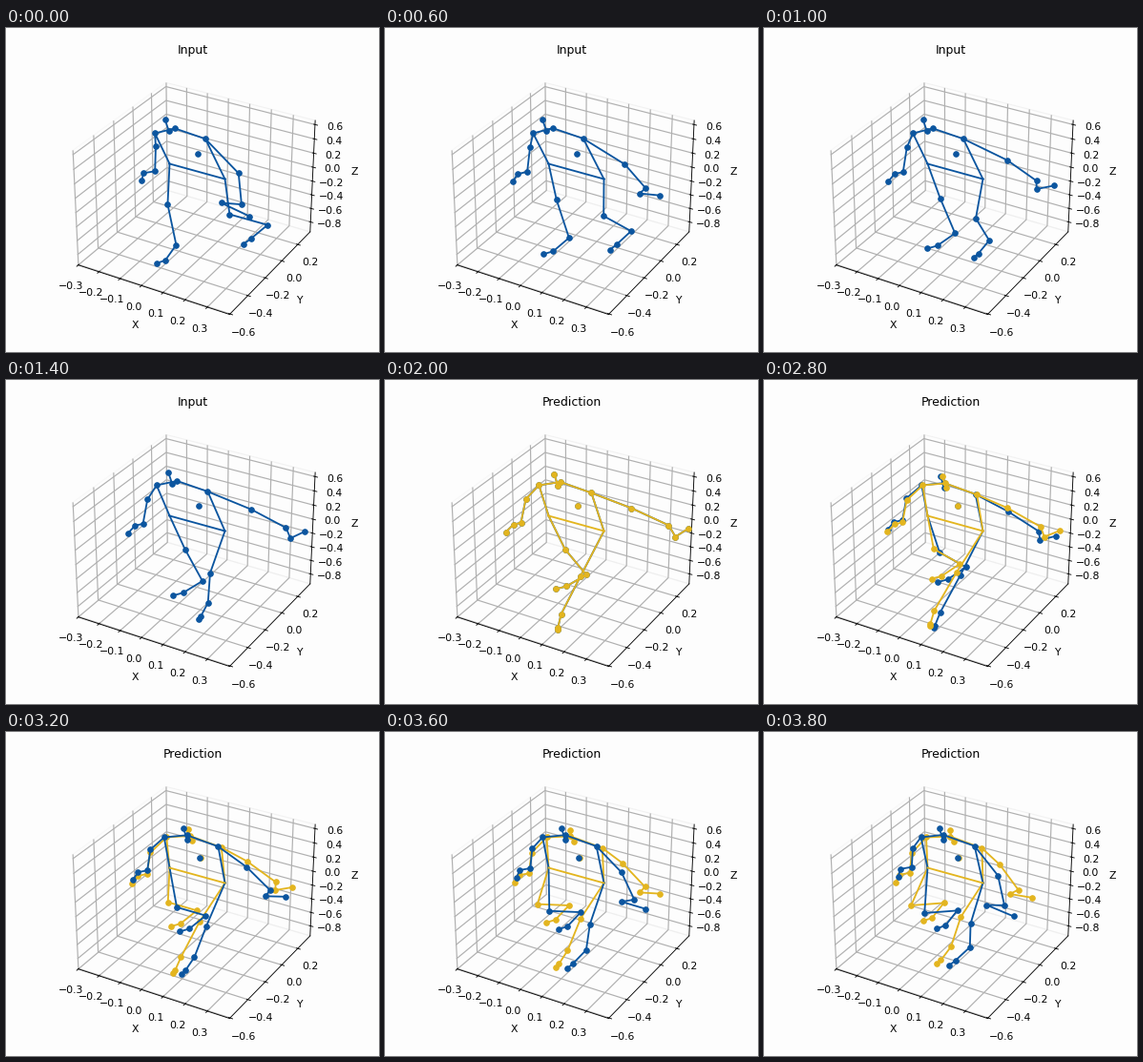
Write a matplotlib script that moves like this. It is 391 by 340 pixels and loops after 4000 ms.

```python
import numpy as np
import matplotlib.pyplot as plt
from matplotlib.animation import FuncAnimation

W, H, DPI = 391, 340, 78
STEP, LOOP, SWITCH, CROSS, LAST = 200, 4000, 2000, 3000, 3800
BLUE, YELLOW = "#0b559f", "#e3b51f"

plt.rcParams.update({"font.family": "DejaVu Sans", "grid.linewidth": 1.1})
fig = plt.figure(figsize=((W + 1e-6) / DPI, (H + 1e-6) / DPI), dpi=DPI,
                 facecolor="#fdfdfd")


def arc(ms):
    """0 at full reach, about 1 at both ends of the loop."""
    return ((ms - 1950) / 1900) ** 2


def step(ms):
    """Like arc, with a slow start and finish."""
    return (1 - np.cos(np.pi * (ms - 2200) / 2100)) / 2


def sway(ms):
    return 8 - 10.5 * np.cos(2 * np.pi * (ms - 500) / 5400)


def trunk(ms, extra=0):
    """Head, neck and shoulders lean sideways by their weights."""
    rest = np.array([(201, 132), (167, 96), (171, 108),
                     (177, 105), (156, 110), (209, 116)])
    weight = np.array([(0.1, 0), (1, 0.25), (1, 0.25),
                       (0.65, 0.15), (0.5, 0), (0.7, 0.2)])
    return rest + weight * (sway(ms) + extra)


class Limb:
    """Joints (x, y) that fold by (dx, dy) while the whole limb drifts."""

    def __init__(self, joints, fold, drift, root, lag, lean):
        joints = np.array(joints, float)
        self.reach, self.bend = joints[:, :2], joints[:, 2:]
        self.fold, self.lag, self.lean = fold, lag, np.array(lean)
        self.drift = np.outer([root, 1, 1, 1], drift)

    def observed(self, ms):
        return (self.reach + self.bend * self.fold(ms)
                + self.drift * ms / LAST)

    def predicted(self, ms, s):
        return self.observed(ms - self.lag * s) + self.lean * s


LIMBS = [
    Limb([(147, 126, 9, -2), (142, 154, 13, -4),
          (134, 156, 9, -4), (126, 164, 15, -4)],
         arc, drift=(0, -9), root=0.3, lag=350, lean=(2, 4)),
    Limb([(258, 134, -14, 17), (297, 152, -48, 31),
          (304, 164, -75, 18), (318, 155, -60, 40)],
         arc, drift=(0, 0), root=0, lag=400, lean=(-3, -5)),
    Limb([(190, 174, -20, 10), (199, 225, -20, 2),
          (178, 237, -11, 6), (167, 240, -9, 6)],
         arc, drift=(22, -40), root=-0.15, lag=0, lean=(-14, -8)),
    Limb([(212, 203, 22, -8), (209, 238, 65, -32),
          (206, 252, 51, -32), (206, 254, 43, -28)],
         step, drift=(-50, 15), root=0.3, lag=500, lean=(-5, -9)),
]


def observed(ms):
    return np.vstack([trunk(ms)] + [limb.observed(ms) for limb in LIMBS])


def predicted(ms):
    s = (ms - SWITCH) / (LAST - SWITCH)
    return np.vstack([trunk(ms, 11 * s * s)]
                     + [limb.predicted(ms, s) for limb in LIMBS])


HIPS = np.array([(171, 142), (229, 158)], float)
LEFT, RIGHT, GAP = 22, 23, 24
CHAINS = [
    (1, 2, 3), (LEFT, 4, 3, 5, RIGHT),
    (4, 6, 7, 8, 9), (5, 10, 11, 12, 13),
    (LEFT, 14, 15, 16, 17), (RIGHT, 18, 19, 20, 21),
]
ORDER = [j for chain in CHAINS for j in (*chain, GAP)]

# 3D frame
ax = fig.add_axes([54 / W, 21.6 / H, 283 / W, 283 / H], projection="3d")
ax.patch.set_visible(False)
ax.view_init(elev=30, azim=-60)
ax.set_xticks(np.arange(-3, 4) / 10)
ax.set_yticks(np.arange(-3, 2) / 5)
ax.set_zticks(np.arange(-4, 4) / 5)
ax.set(xlim=(-0.302, 0.398), ylim=(-0.605, 0.36), zlim=(-0.948, 0.657),
       xlabel="X", ylabel="Y", zlabel="Z")
for axis in (ax.xaxis, ax.yaxis, ax.zaxis):
    axis.pane.set_fill(False)
title = ax.set_title("Input", fontsize=11.5, pad=7.5)

# Flat layer in pixels for the skeletons
layer = fig.add_axes([0, 0, 1, 1], zorder=5)
layer.set(xlim=(-0.5, W - 0.5), ylim=(H - 0.5, -0.5))
layer.axis("off")


def skeleton(color, z):
    bones, = layer.plot([], [], color=color, lw=1.7, zorder=z)
    dots, = layer.plot([], [], "o", color=color, ms=5.1, zorder=z)
    return bones, dots


def pose(parts, pts):
    bones, dots = parts
    full = np.vstack([pts, HIPS, [(np.nan, np.nan)]])
    bones.set_data(*full[ORDER].T)
    dots.set_data(*pts.T)


blue = skeleton(BLUE, 2)
yellow = skeleton(YELLOW, 3)
hips, = layer.plot(*HIPS.T, lw=1.7, zorder=4)


def draw(k):
    ms = k * STEP
    late = ms >= SWITCH
    title.set_text("Prediction" if late else "Input")
    hips.set_color(YELLOW if late else BLUE)
    pose(blue, observed(ms))
    pose(yellow, predicted(ms))
    for part in yellow:
        part.set_visible(late)
        part.set_zorder(3 if ms < CROSS else 1)
    return (title, hips, *blue, *yellow)


anim = FuncAnimation(fig, draw, frames=LOOP // STEP, interval=STEP,
                     repeat=True, repeat_delay=0, blit=False)
plt.show()
```
